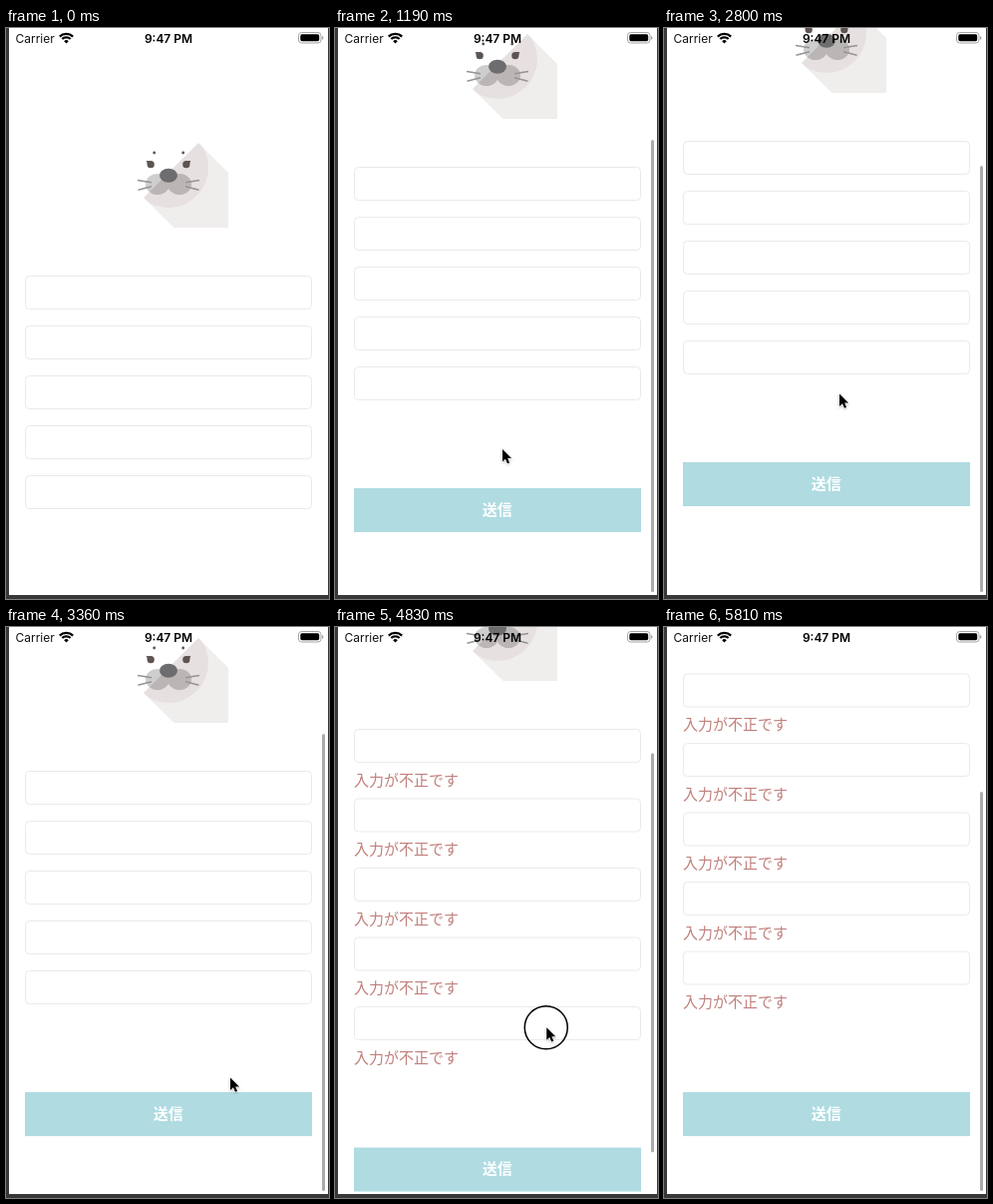
Recreate the animation shown at these times as an HTML page. Size 324 px wide and 572 px high, loop 6440 ms.

```html
<!DOCTYPE html>
<html lang="ja">
<head>
<meta charset="utf-8">
<title>Form validation</title>
<style>
  html, body { margin: 0; width: 100%; height: 100%; overflow: hidden; background: #fff; }
  svg { display: block; width: 100%; height: 100%; }
  .status { font: 12px Inter, sans-serif; fill: #111; }
  .time { font-weight: 600; fill: #000; }
  .jp { font: 15px "Noto Sans CJK JP", "Noto Sans CJK", sans-serif; }
  .field { fill: #fff; stroke: #eaeaea; }
  .error { fill: #c07f7b; font-weight: 300; }
  .send { fill: #fff; font-weight: 700; }
</style>
</head>
<body>
<svg viewBox="0 0 324 572">
  <defs>
    <clipPath id="cast"><path d="M193 115L223 145V200H168.500L138 170Z"/></clipPath>
  </defs>
  <rect width="324" height="572" fill="#fff"/>

  <g id="content">
    <g id="seal">
      <g fill="#cecece">
        <ellipse cx="152" cy="156.500" rx="12" ry="10.500"/>
        <ellipse cx="174" cy="156.500" rx="12" ry="10.500"/>
      </g>
      <g clip-path="url(#cast)" fill="#3c0f0f">
        <rect x="130" y="110" width="94" height="90" opacity=".075"/>
        <circle cx="163" cy="140" r="40" opacity=".055"/>
      </g>
      <path d="M132 152.500L146 154.800M132.500 162.300L146 158.800M194 152.500L180 154.800M193.500 162.300L180 158.800" stroke="#969494" stroke-width="1.600"/>
      <ellipse cx="163" cy="147.700" rx="9" ry="7" fill="#6d6c6e"/>
      <g fill="#5d5350">
        <circle cx="148.700" cy="125" r="1.400"/>
        <circle cx="177.700" cy="125" r="1.400"/>
        <circle cx="145.200" cy="136.700" r="3.600"/>
        <circle cx="180.800" cy="136.700" r="3.600"/>
        <path d="M140.700 133L145 133.200L142 136.500ZM185.300 133L181 133.200L184 136.500Z"/>
      </g>
    </g>
    <g id="rows"></g>
    <g id="button">
      <rect x="19" width="288" height="44" fill="#afdbe1"/>
      <text class="jp send" x="162.700" y="26.800" text-anchor="middle">送信</text>
    </g>
  </g>

  <rect id="bar" x="317" width="3" rx="1.500" fill="#000"/>

  <g class="status">
    <text x="9.500" y="14.500">Carrier</text>
    <text class="time" x="163" y="14.500" text-anchor="middle">9:47 PM</text>
    <path d="M53.800 8.600A9.500 9.500 0 0 1 67.200 8.600M56.300 11.100A5.900 5.900 0 0 1 64.700 11.100" fill="none" stroke="#000" stroke-width="2.200"/>
    <path d="M60.500 15.600L58.200 13.200A3.250 3.250 0 0 1 62.800 13.200Z" fill="#000"/>
    <rect x="293.500" y="4.500" width="22.500" height="10.500" rx="3" fill="none" stroke="#a6a6a6"/>
    <rect x="295.300" y="6.300" width="18.900" height="6.900" rx="1.600" fill="#000"/>
    <path d="M317 8V11.800Q318.500 11.200 318.500 9.900T317 8Z" fill="#a6a6a6"/>
  </g>

  <path d="M0 0H3V568H323V0H324V572H0Z" fill="#39373a"/>

  <g id="pointer">
    <circle id="touch" cx="-.5" r="21.500" fill="none" stroke="#000" stroke-width="1.500"/>
    <path transform="scale(.92)" d="M0 0V13.600L3.200 10.700L5.400 15.600L7.700 14.600L5.600 9.900H9.800Z" fill="#000" stroke="#fff" stroke-width="1.200" paint-order="stroke" style="filter:drop-shadow(0 1px 1px rgba(0,0,0,.25))"/>
  </g>
</svg>
<script>
const LOOP = 6440, STEP = 70, ERRORS_AT = 4130, BAR_END = 565, SPRING = 0.012;

// Layout and scroll limits of the form before and after validation
const PLAIN = { pitch: 50, button: 570, max: 104, barLength: 458, barStart: 22.5 };
const FAILED = { pitch: 69.5, button: 667.5, max: 201.5, barLength: 400, barStart: 24 };

// Each swipe eases to its peak, then springs back inside the limit
const swipes = [
  { start: 560, end: 980, from: 0, peak: 122, release: 910 },
  { start: 1750, end: 2170, from: 104, peak: 24, release: 2170 },
  { start: 2170, end: 2700, from: 24, peak: 151, release: 2520 },
  { start: 4620, end: 5130, from: 104, peak: 218, release: 5000 }
];
const tap = { start: 3920, release: 4200 };

// Places where the pointer turns or rests
const stops = [
  { t: 280, x: 172, y: 590 },
  { t: 1190, x: 168, y: 422 },
  { t: 1750, x: 166, y: 414 },
  { t: 2170, x: 166, y: 494.5 },
  { t: 2800, x: 176, y: 366.5 },
  { t: 3360, x: 225, y: 451.5 },
  { t: 3850, x: 214, y: 484 },
  { t: 4620, x: 214, y: 484 },
  { t: 5000, x: 211, y: 341 },
  { t: 5810, x: 239, y: 590 }
];

const $ = id => document.getElementById(id);
const clamp = u => Math.min(1, Math.max(0, u));
const smooth = u => u * u * (3 - 2 * u);
const mix = (a, b, u) => a + (b - a) * u;
const moveTo = (el, x, y) => el.setAttribute('transform', `translate(${x} ${y})`);

function scrollAt(t, max) {
  const swipe = swipes.findLast(s => t >= s.start);
  if (!swipe) return 0;
  const { start, end, from, peak } = swipe;
  if (t < end) return mix(from, peak, smooth((t - start) / (end - start)));
  const rest = Math.min(peak, max), x = SPRING * (t - end);
  return rest + (peak - rest) * (1 + x) * Math.exp(-x);
}

function pointerAt(t) {
  const next = stops.findIndex(s => s.t > t);
  if (next < 1) return next ? stops[stops.length - 1] : stops[0];
  const a = stops[next - 1], b = stops[next], u = smooth((t - a.t) / (b.t - a.t));
  return { x: mix(a.x, b.x, u), y: mix(a.y, b.y, u) };
}

function barOpacity(t) {
  if (t < 560) return 0;
  if (t < ERRORS_AT) return 0.33 * clamp((3780 - t) / 250);
  return t < 4690 ? 0 : 0.33;
}

function drawBar(scroll, { max, barLength, barStart }, opacity) {
  const rest = BAR_END - barLength;
  const top = scroll > max ? rest + scroll - max : mix(barStart, rest, scroll / max);
  const bar = $('bar');
  bar.setAttribute('y', top);
  bar.setAttribute('height', Math.min(barLength, BAR_END - top));
  bar.setAttribute('opacity', opacity);
}

$('rows').innerHTML = `<g>
  <rect class="field" x="19.5" y=".5" width="287" height="33" rx="4"/>
  <text class="jp error" x="19" y="56.5">入力が不正です</text></g>`.repeat(5);
const rows = [...$('rows').children];

function render(t) {
  const form = t < ERRORS_AT ? PLAIN : FAILED;
  const scroll = Math.round(2 * scrollAt(t, form.max)) / 2;
  moveTo($('content'), 0, -scroll);
  rows.forEach((row, i) => {
    moveTo(row, 0, 248 + i * form.pitch);
    row.lastElementChild.style.display = form === FAILED ? '' : 'none';
  });
  moveTo($('button'), 0, form.button);
  drawBar(scroll, form, barOpacity(t));

  const { x, y } = pointerAt(t);
  moveTo($('pointer'), x, y);
  const pressed = [...swipes, tap].some(s => t >= s.start && t < s.release);
  $('touch').style.display = pressed ? '' : 'none';
}

const begin = performance.now();
function tick() {
  const t = (performance.now() - begin) % LOOP;
  render(Math.floor(t / STEP) * STEP);
  requestAnimationFrame(tick);
}
tick();
</script>
</body>
</html>
```
